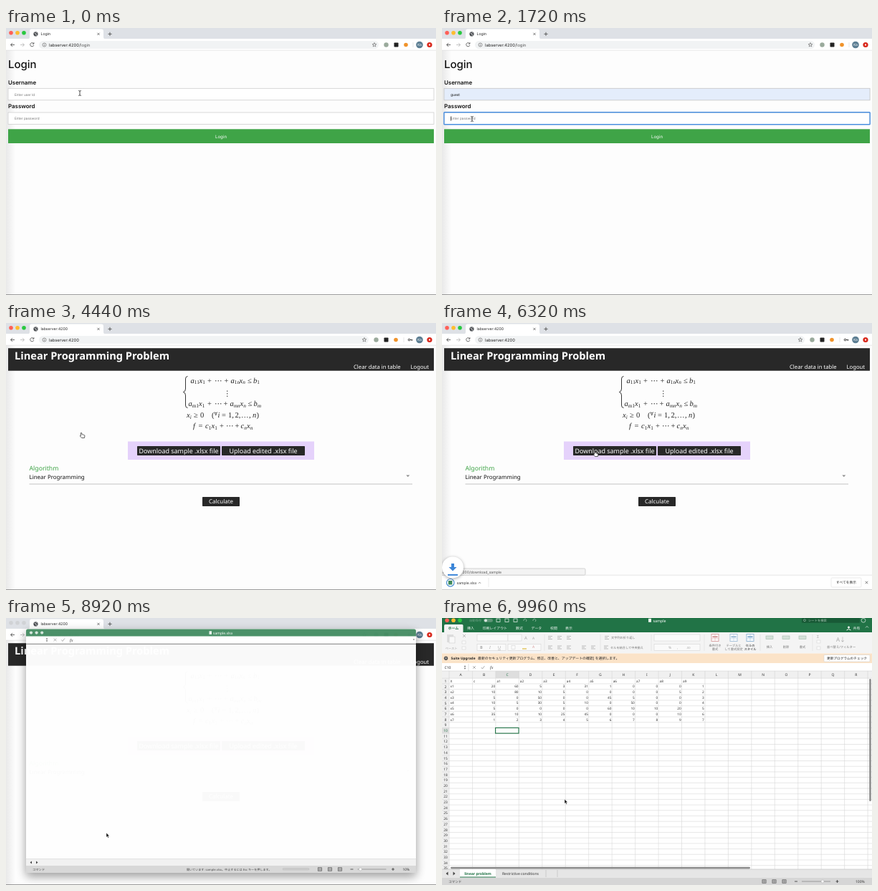
An HTML page for the animation above (10000 ms loop, 600 by 373 pixels).

```html
<!DOCTYPE html>
<html lang="en">
<head>
<meta charset="utf-8">
<title>Login</title>
<style>
html, body { margin: 0; width: 100%; height: 100%; overflow: hidden; background: #fdfdfd; }
svg { display: block; width: 600px; height: 373px; }
text { font-family: Inter, "Noto Sans CJK JP", "Noto Sans CJK", sans-serif; text-rendering: geometricPrecision; white-space: pre; }
.page text { font-family: "Noto Sans", sans-serif; }
.page .math text { font-family: "Liberation Serif", serif; font-style: italic; }
.page .math .up { font-style: normal; }
.sheet text { font-family: "Noto Sans", "Noto Sans CJK JP", "Noto Sans CJK", sans-serif; }
#loading { filter: drop-shadow(0 5px 7px rgba(0,0,0,.4)); }
</style>
</head>
<body>
<script>
const LOOP = 10000;
const HOST = 'labserver:4200';

// Drawing helpers, each returning SVG markup
const rect = (x, y, w, h, fill, more = '') =>
  `<rect x="${x}" y="${y}" width="${w}" height="${h}" fill="${fill}" ${more}/>`;
const dot = (x, y, r, fill, more = '') => `<circle cx="${x}" cy="${y}" r="${r}" fill="${fill}" ${more}/>`;
const line = (d, color, w = .7, more = '') =>
  `<path d="${d}" fill="none" stroke="${color}" stroke-width="${w}" ${more}/>`;
const shape = (d, fill, more = '') => `<path d="${d}" fill="${fill}" ${more}/>`;
const text = (x, y, size, s, fill = '#222', more = '') =>
  `<text x="${x}" y="${y}" font-size="${size}" fill="${fill}" ${more}>${s}</text>`;
const group = (id, body, cls = '') => `<g id="${id}" class="${cls}">${body}</g>`;
const MID = 'text-anchor="middle"', END = 'text-anchor="end"', BOLD = 'font-weight="700"';
const cross = (x, y, r, color, w) =>
  line(`M${x - r} ${y - r}l${2 * r} ${2 * r}m0 ${-2 * r}l${-2 * r} ${2 * r}`, color, w);
const plus = (x, y, r, color, w) => line(`M${x - r} ${y}h${2 * r}m${-r} ${-r}v${2 * r}`, color, w);
const lights = (y, colors, r = 2.8, x = 7, gap = 9) =>
  colors.map((c, i) => dot(x + i * gap, y, r, c)).join('');
const TRAFFIC = ['#ff5f57', '#febc2e', '#28c840'];
const updown = (x, y) => shape(`M${x - 1.3} ${y - .8}l1.3-2 1.3 2zm0 1.6l1.3 2 1.3-2z`, '#666');
const check = (x, y) => line(`M${x - 2.2} ${y}l1.6 2 3-4`, '#999', .8);
const fx = (x, y) => text(x, y, 6, 'fx', '#333', 'font-style="italic" style="font-family:\'Liberation Serif\',serif"');

function star(x, y) {
  let d = '';
  for (let i = 0; i < 10; i++) {
    const a = i * Math.PI / 5, r = i % 2 ? 1.3 : 3;
    d += `${i ? 'L' : 'M'}${(x + r * Math.sin(a)).toFixed(2)} ${(y - r * Math.cos(a)).toFixed(2)}`;
  }
  return line(d + 'z', '#555', .6);
}

function extensions(x) {
  return star(x, 23.5) + dot(x + 16.5, 23.5, 3.2, '#9aaa9c') +
    rect(x + 27.5, 20.5, 6, 6, '#222', 'rx=".8"') + dot(x + 44, 23.5, 2.8, '#f0932b');
}

function browser() {
  return rect(0, 0, 600, 15.5, '#dee1e6') + rect(0, 15, 600, 16, '#fff') +
    group('active', lights(6.8, TRAFFIC)) + group('inactive', lights(6.8, ['#d0d2d5', '#d0d2d5', '#d0d2d5'])) +
    shape('M30 15.5q3 0 3-3V4.500q0-3 3-3H133q3 0 3 3v8q0 3 3 3z', '#fff') +
    dot(41.5, 8.4, 3.1, '#4a4d51') +
    line('M39.500 7l2 .8 .4 2 1.800 .5M42 5.700l1.500 1.600', '#e8e8e8', .8) +
    cross(129, 8.4, 1.6, '#444', .7) + plus(145, 8.4, 2.6, '#444', .8) +
    line('M12 23.500H6.500m2.500-2.500l-2.500 2.500 2.500 2.500', '#444', .8) +
    line('M20 23.500h5.500m-2.500-2.500l2.500 2.500-2.500 2.500', '#b5b5b5', .8) +
    line('M38.500 21.800a2.600 2.600 0 1 0 .3 2.300M38.900 20.200v2h-2', '#444', .8) +
    group('barWide', rect(46, 18, 474, 11, '#f1f3f4', 'rx="5.5"') + extensions(514) +
      line('M568 20v7', '#ccc', .5)) +
    group('barKey', rect(46, 18, 460, 11, '#f1f3f4', 'rx="5.5"') + extensions(500) +
      line('M555 20v7', '#ccc', .5) + dot(562.500, 23.500, 1.3, 'none', 'stroke="#333" stroke-width="1"') +
      line('M563.800 23.500h3.500m-1 0v1.400', '#333', .9)) +
    dot(53.5, 23.5, 2.5, 'none', 'stroke="#555" stroke-width=".6"') +
    line('M53.500 23.200v1.800m0-3.100v.6', '#555', .6) +
    dot(577, 23.5, 4.8, '#5b7d92') + text(577, 25.2, 4.6, 'Ka', '#fff', MID) +
    dot(591, 23.5, 3.6, '#d8281c') + rect(590, 22.5, 2, 2, '#fff') +
    line('M0 31.200H600', '#d9d9d9', .6);
}

function login() {
  const field = (y, color = '#fff') => rect(3, y, 594, 16.5, color, 'stroke="#c8c8c8" stroke-width=".7"');
  return text(48.5, 10.4, 5.2, 'Login') +
    text(60, 25.6, 5.8, HOST + '<tspan fill="#555">/login</tspan>') +
    text(3, 56, 15, 'Login', '#111', 'font-weight="500"') +
    text(3, 78.5, 7.9, 'Username', '#111', 'font-weight="600"') +
    text(3, 112.2, 7.9, 'Password', '#111', 'font-weight="600"') +
    field(84.3) + field(118) +
    group('userEmpty', text(12, 94.5, 4.7, 'Enter user Id', '#757575')) +
    group('userFilled', field(84.3, '#e4edfb') + text(12, 94.5, 4.9, 'guest', '#111')) +
    group('passEmpty', text(12, 128.3, 4.7, 'Enter password', '#757575')) +
    group('dots', Array.from({ length: 5 }, (_, i) => dot(13.5 + i * 2.9, 126.6, 1, '#222')).join('')) +
    rect(3, 141.3, 594, 19.7, '#3fa447', 'id="button"') + text(300, 153.6, 6.2, 'Login', '#fff', MID) +
    rect(2.8, 84.1, 594.4, 16.9, 'none', 'id="ring" stroke="#4a8fe0" stroke-width="1.4" rx=".8"') +
    line('M12.500 123.500v6.200', '#111', .7, 'id="caret"');
}

// Each term: x, base, optional subscript; upright unless it is a letter
const formula = (y, ...terms) => terms.map(([x, base, sub]) =>
  `<text x="${x}" y="${y}" font-size="10.5" fill="#222" class="${/[a-z]/.test(base) ? '' : 'up'}">${base}` +
  (sub ? `<tspan font-size="7.3" dy="1.8" class="${/\d/.test(sub) ? 'up' : ''}">${sub}</tspan>` : '') + '</text>').join('');

function app() {
  const black = (x, y, w, h) => rect(x, y, w, h, '#282828', 'rx=".8"');
  const math = formula(83.5, [257.5, 'a', '11'], [269.5, 'x', '1'], [281, '+'], [291, '⋯'], [304.5, '+'],
      [313.5, 'a', '1n'], [325.5, 'x', 'n'], [337, '≤'], [345, 'b', '1']) +
    formula(102, [303.5, '⋮']) +
    formula(116, [254.5, 'a', 'm1'], [269, 'x', '1'], [281, '+'], [291, '⋯'], [303.5, '+'],
      [312.5, 'a', 'mn'], [326.5, 'x', 'n'], [337.5, '≤'], [345.5, 'b', 'm']) +
    formula(132, [252, 'x', 'i'], [262, '≥'], [271, '0'], [287, '('], [295.5, 'i'], [301, '='], [310, '1,'],
      [319.5, '2,'], [328, '…'], [339, ','], [344, 'n'], [349.5, ')']) +
    text(290.5, 128.5, 6.5, '∀', '#222', 'class="up"') +
    formula(147, [261, 'f'], [268.5, '='], [278, 'c', '1'], [286.5, 'x', '1'], [298, '+'], [307, '⋯'],
      [319.5, '+'], [327.5, 'c', 'n'], [336, 'x', 'n']);
  return text(48.5, 10.4, 5.2, HOST, '#222', 'style="font-family:Inter,sans-serif"') +
    text(60, 25.6, 5.8, HOST, '#222', 'style="font-family:Inter,sans-serif"') +
    rect(3, 35.2, 594, 31.5, '#282828') +
    text(12, 50.6, 14.6, 'Linear Programming Problem', '#fff', BOLD) +
    text(485, 63.6, 7.7, 'Clear data in table', '#fff') + text(564.5, 63.6, 7.7, 'Logout', '#fff') +
    `<g class="math">${math}</g>` +
    line('M253.500 74.500q-3 0-3 3.500v14q0 4-3.200 4.500q3.200 .5 3.200 4.500v14q0 3.500 3 3.500', '#222', .9) +
    rect(170, 165.5, 260, 25.5, '#e5d2fb') + black(183, 172, 116, 13) + black(301, 172, 116, 13) +
    text(241, 181.7, 8.95, 'Download sample .xlsx file', '#fff', MID) +
    text(359, 181.7, 8.95, 'Upload edited .xlsx file', '#fff', MID) +
    text(32.5, 206.2, 8.7, 'Algorithm', '#3fa447') + text(32.5, 217.8, 7.95, 'Linear Programming', '#111') +
    line('M32.500 225H567', '#aaa', .7) + shape('M558.300 212.500h5l-2.500 2.500z', '#888') +
    black(274, 243, 52, 13) + text(300, 252.2, 7.95, 'Calculate', '#fff', MID);
}

function shelf() {
  const chevron = x => line(`M${x - 1.5} 363.800l1.500-1.600 1.500 1.600`, '#555', .7);
  return rect(0, 352, 600, 20.5, '#fff') + line('M0 352.200H600', '#d5d5d5', .6) +
    rect(0, 352.4, 98, 19.8, '#c8c8c8', 'id="hover"') +
    rect(8.800, 360, 5.5, 5.5, '#3f8a5c') +
    group('fetch', dot(11.7, 362.8, 5.3, 'none', 'stroke="#4a90d0" stroke-width="1.2"') + chevron(52.5) +
      line('M65 356v13', '#ddd', .6)) +
    group('fetched', chevron(88)) +
    text(20.5, 365, 5.05, 'sample.xlsx', '#333') +
    rect(543, 356, 42, 13, '#fff', 'stroke="#ddd" stroke-width=".6" rx="1.5"') +
    text(564, 364.3, 4.75, 'すべてを表示', '#222', MID) + cross(592.5, 362.5, 1.7, '#444', .7);
}

const status = (x, y, pct, knob) =>
  [0, 14, 28].map(d => rect(x + d, y - 2.2, 5, 4.4, 'none', 'stroke="#555" stroke-width=".8"') +
    line(`M${x + d} ${y}h5m-2.500-2v4`, '#666', .6)).join('') +
  line(`M${x + 45} ${y}h4`, '#333', .8) + line(`M${x + 55} ${y}h40`, '#999', 1) + dot(x + knob, y, 2, '#fff', 'stroke="#aaa" stroke-width=".5"') +
  plus(x + 104.5, y, 2, '#333', .8) + text(x + 118, y + 1.7, 4.9, pct, '#333');

function loading() {
  return rect(28, 15.5, 544, 340.5, '#fff', 'rx="2"') + shape('M28 25.500v-7.500q0-2.500 2.500-2.500h539q2.500 0 2.500 2.500v7.500z', '#488f66') +
    lights(20.6, ['#d5e6dc', '#d5e6dc', '#d5e6dc'], 2.1, 35, 7.6) +
    rect(283.500, 18.3, 3.5, 4.6, '#e8f2ec') + text(289, 22.6, 5, 'sample.xlsx', '#fff') +
    updown(57, 30.5) + cross(68.5, 30.5, 1.8, '#999', .8) + check(79.5, 30.5) + fx(89, 32.5) +
    dot(569, 30, .8, '#555') + line('M28 36.300H572', '#777', .9) +
    rect(28, 336.5, 544, 9.5, '#f1f1f1') + line('M28 336.500H572', '#ccc', .5) +
    shape('M36 339.500v4l-2.500-2zm6 0v4l2.500-2z', '#444') +
    rect(28, 346, 544, 10, '#d8d8d8') + text(37, 352.7, 4.3, 'コマンド', '#444') +
    text(252, 352.700, 4.1, '開いています: sample.xlsx。中止するには Esc キーを押します。', '#444') +
    rect(386, 349.500, 37, 2.6, '#cacaca', 'stroke="#b5b5b5" stroke-width=".4" rx="1.3"') + status(435.5, 351, '10%', 59);
}

const COLS = 18, COL_W = 32.45, ROW_H = 7.69, LEFT = 10, TOP = 84.2;
const TABLE = [
  'X c a1 a2 a3 a4 a5 a6 a7 a8 a9',
  'x1 20 60 5 3 31 1 0 0 0 1', 'x2 10 80 10 5 0 0 0 0 5 2', 'x3 5 0 50 0 0 45 5 0 0 3',
  'x4 10 5 30 5 10 0 50 0 0 4', 'x5 5 0 0 0 0 60 10 10 20 5', 'x6 35 10 10 25 45 0 0 0 10 6',
  'x7 1 2 3 4 5 6 7 8 9 7'].map(r => r.split(' '));

function ribbon() {
  const faded = '#a8a8a8';
  const label = (x, y, s, c = '#777') => text(x, y, 4.3, s, c, MID);
  const box = (x, y, w, h = 9) => rect(x, y, w, h, '#fafafa', 'stroke="#d5d5d5" stroke-width=".6"');
  const bars = (x, y) => line(`M${x} ${y - 2}h6m-6 2h4m-4 2h6`, faded, .7);
  let s = rect(0, 20, 600, 29.5, '#f4f4f4') +
    rect(7, 23, 9, 11, '#ddd') + rect(10, 26, 8, 9, '#f8f8f8', 'stroke="#ccc" stroke-width=".6"') +
    label(13, 43.500, 'ペースト', faded) + cross(31, 25, 2, faded, .7) + box(28, 32, 5, 4) + box(28, 40, 5, 4) +
    box(49, 23, 43) + box(92, 23, 19) + box(49, 36.5, 40) + box(92, 36.5, 46) +
    text(115, 30, 6, 'A', faded) + text(126, 30, 5, 'A', faded) +
    text(53, 43, 5.5, 'B', faded, BOLD) + text(66, 43, 5.5, 'I', faded, 'font-style="italic"') +
    text(78, 43, 5.5, 'U', faded, 'text-decoration="underline"') + box(97, 38.5, 5, 5) +
    line('M112 43h6', '#e8d48a', 2) + text(126, 42, 5, 'A', '#d89a9a');
  for (const x of [148, 161, 174]) s += bars(x, 27.5) + bars(x, 41);
  s += bars(195, 41) + bars(208, 41) + bars(227, 27.5) + bars(226, 41) +
    text(236, 29.2, 4.2, '文字列の折り返し', '#777') + text(235, 42.7, 4.2, 'セルを結合して中央揃え', '#777') +
    box(296, 23, 64) + box(296, 36.5, 64) + text(316, 43, 5, '%', faded) + text(328, 43, 5, ',', faded) +
    text(341, 42.7, 4, '.00', faded) + line('M143 23v23M221 23v23M292 23v23M366 23v23M444 23v23M517 23v23', '#ddd', .6);
  for (const [x, c] of [[376, '#d9a5a5'], [402, '#a9c3da'], [425, '#96b8d5']])
    s += rect(x, 22.5, 10, 10, '#fff', `stroke="${c}" stroke-width="1"`) + rect(x + 1.5, 25, 7, 2.5, c) + line(`M${x} 29h10m-5-6v9`, c, .5);
  s += label(381, 39.5, '条件付き') + label(381, 45.3, '書式') + label(407, 39.500, 'テーブルと') + label(407, 45.3, 'して書式設定') +
    label(430, 39.5, 'セルの', '#222') + label(430, 45.3, 'スタイル', '#222');
  [['挿入', 457], ['削除', 480], ['書式', 503]].forEach(([n, x]) => {
    s += rect(x - 5, 25, 10, 4.5, '#d5e1d9', 'stroke="#a5bdae" stroke-width=".6"') + label(x, 42, n);
  });
  return s + text(523, 28, 5.5, 'Σ', faded) + box(523, 31, 5, 4) + box(523, 40, 5, 4) +
    text(550, 33, 8, 'A↓', faded) + text(537, 42, 4.3, '並べ替え/フィルター', '#777');
}

function sheet() {
  const white = '#f2f7f4';
  let s = rect(0, 0, 600, 373, '#fff') + rect(0, 0, 600, 20, '#217346') + lights(3.2, TRAFFIC) +
    text(38, 5, 4.3, '自動保存', '#6fa286') + rect(58, 1, 13, 4.800, '#5d9476', 'rx="2.4"') + dot(61, 3.4, 2, '#d8e6de');
  for (const x of [76, 88, 100]) s += rect(x, 1, 5, 4.5, 'none', 'stroke="#d8e6de" stroke-width=".8"');
  s += line('M114 4a2 2 0 1 1 3 1M127 4a2 2 0 1 1 3 1', '#9cc0ab', .8) +
    rect(288, .8, 4, 5, '#e8f2ec') + text(294.5, 5.5, 5.3, 'sample', '#fff') +
    rect(502, .3, 81, 6.5, '#185a36', 'rx="1"') + dot(506, 3.2, 1.5, 'none', 'stroke="#a9c7b5" stroke-width=".6"') +
    text(511, 5, 4.3, 'シートを検索', '#a9c7b5') + dot(588, 3.3, 2.9, 'none', 'stroke="#e0ebe4" stroke-width=".7"') +
    shape('M3 20V10.500q0-1.500 1.500-1.500H28q1.500 0 1.500 1.500V20z', '#f4f4f4') + text(8.5, 16.2, 5, 'ホーム', '#217346', BOLD);
  [['挿入', 35], ['印刷レイアウト', 56.5], ['数式', 103], ['データ', 124.5], ['校閲', 151], ['表示', 172], ['共有', 573.5]]
    .forEach(([n, x]) => { s += text(x, 16.2, 4.95, n, white); });
  s += dot(567.5, 13, 1.5, white) + line('M564.500 17q3-3 6 0', white, 1) + line('M591 13.500l2-2 2 2', white, .7) + ribbon() +
    rect(0, 49.5, 600, 13.5, '#fbe3c8') + dot(5.500, 56.2, 2.7, '#555') + cross(5.5, 56.2, 1, '#fff', .6) +
    text(12.5, 58, 4.8, 'Suite Upgrade', '#222', BOLD) +
    text(50, 58, 4.9, '最新のセキュリティ更新プログラム、修正、改善と、アップデートの確認] を選択します。', '#222') +
    rect(533, 51.5, 64, 9.5, '#fff', 'stroke="#ccc" stroke-width=".5" rx="1"') +
    text(565, 57.9, 4.7, '更新プログラムのチェック', '#222', MID) +
    text(3.500, 71, 5, 'C10') + updown(32, 69) + cross(45, 69, 1.8, '#999', .8) + check(57, 69) + fx(67, 71) +
    line('M37 64v10', '#ccc', .6) + rect(0, 74, 600, 10.2, '#f0f0f0') + rect(0, 84, LEFT, 267, '#f0f0f0') +
    rect(LEFT + 2 * COL_W, 74, COL_W, 10, '#dedede') + rect(0, TOP + 9 * ROW_H, LEFT, ROW_H, '#dedede');
  let grid = 'M0 74H600M0 84.200H600';
  for (let c = 0; c <= COLS; c++) {
    const x = LEFT + c * COL_W;
    grid += `M${x} 74V351`;
    if (c < COLS) s += text(x + COL_W / 2, 81.2, 5, String.fromCharCode(65 + c), c === 2 ? '#217346' : '#333', MID);
  }
  for (let r = 1; r <= 35; r++) {
    const y = TOP + r * ROW_H;
    if (r < 35) grid += `M0 ${y}H600`;
    s += text(5, y - 2, 4.9, r, r === 10 ? '#217346' : '#333', MID);
  }
  s += line(grid, '#d4d4d4', .55);
  TABLE.forEach((row, r) => row.forEach((v, c) => {
    const y = TOP + (r + 1) * ROW_H - 2.2, x = LEFT + c * COL_W, left = r === 0 || c === 0;
    s += text(left ? x + 1.5 : x + COL_W - (c === 10 ? 1.2 : .8), y, 4.7, v, '#333', left ? '' : END);
  }));
  s += rect(LEFT + 2 * COL_W - .3, TOP + 9 * ROW_H, COL_W, ROW_H, 'none', 'stroke="#217346" stroke-width="1.1"') +
    rect(12, 347.8, 418, 2.6, '#8d8d8d', 'rx="1.3"') + rect(596.2, 85, 2.6, 171, '#8d8d8d', 'rx="1.3"') +
    rect(0, 351, 600, 12, '#e6e6e6') + line('M0 351H600', '#bbb', .6) +
    shape('M8.500 354.500v5l-3-2.500zm7 0v5l3-2.500z', '#444') + rect(25, 351, 50, 11.3, '#fff') +
    line('M25 362H75', '#217346', 1) + text(50, 358.6, 5.1, 'linear problem', '#217346', MID + ' font-weight="600"') +
    text(109.5, 358.6, 5.1, 'Restrictive conditions', '#333', MID) + line('M145 352v10M161 352v10', '#bbb', .6) +
    rect(0, 363, 600, 10, '#d6d6d6') + text(9, 369.8, 4.6, 'コマンド', '#444') + status(447, 368, '', 84) +
    text(577, 369.9, 5, '100%', '#333');
  return s;
}

const POINTERS = {
  beam: line('M-1.800-3.500q1.800 0 1.800 1.200v4.600q0 1.200-1.800 1.200M1.800-3.500Q0-3.500 0-2.300M0 2.300Q0 3.500 1.800 3.500', '#222', .8),
  hand: shape('M-1.600-3.500q.9-.7 1.300 .2l.6 2.100 2.400 .5q1.400 .3 1.200 1.700l-.5 2.500h-3.800l-2.300-2.700q0-1 1.300-.5z', '#fff', 'stroke="#222" stroke-width=".7"'),
  arrow: shape('M0-2.800v6l1.400-1.200 1 2.300 1-.5-1-2.200h1.900z', '#111', 'stroke="#fff" stroke-width=".4"')
};

document.body.innerHTML = `<svg viewBox="0 0 600 373" xmlns="http://www.w3.org/2000/svg">
  <defs><linearGradient id="edge"><stop stop-color="#e9e9e9"/><stop offset="1" stop-color="#e9e9e9" stop-opacity="0"/></linearGradient></defs>` +
  rect(0, 0, 600, 373, '#fdfdfd') + rect(0, 31, 13, 342, 'url(#edge)') + browser() +
  group('login', login()) + group('app', app(), 'page') + line('M0 372.600H600', '#777', .8) +
  group('shelf', shelf()) +
  group('link', rect(-1, 343, 201, 9.2, '#f3f3f3', 'stroke="#bbb" stroke-width=".6" rx="1.5"') +
    text(83, 349.6, 5.1, HOST + '/download_sample', '#555', END)) +
  group('drop', dot(0, 0, 15, '#fff', 'style="filter:drop-shadow(0 1px 2px rgba(0,0,0,.35))"') +
    shape('M-2-5.500h4v5h3.500L0 5-5.500-.5H-2z', '#3c86d8') + rect(-7, 9.5, 14, 2, '#3c86d8')) +
  group('loading', loading(), 'sheet') + group('sheet', sheet(), 'sheet') +
  group('pointer', Object.entries(POINTERS).map(([k, v]) => group(k, v)).join('') +
    dot(0, 0, 9.5, 'none', 'id="press" stroke="#222" stroke-width=".9"')) + '</svg>';

const $ = id => document.getElementById(id);

// Visible from / until, in ms
const SPANS = {
  login: [[0, 3480]], app: [[3480, LOOP]], barWide: [[0, 2400]], barKey: [[2400, LOOP]],
  active: [[0, 8600]], inactive: [[8600, LOOP]],
  userEmpty: [[0, 960]], userFilled: [[960, LOOP]], passEmpty: [[0, 2160]], ring: [[200, 3300]],
  link: [[5480, 6680]], shelf: [[6040, 8560]], fetch: [[6040, 6960]], fetched: [[6960, LOOP]],
  hover: [[7200, LOOP]], drop: [[6080, 6840]], loading: [[8680, LOOP]], sheet: [[9520, LOOP]],
  beam: [[0, 560], [1360, 1920]], hand: [[1920, 4560], [5240, 6560]],
  arrow: [[560, 1360], [4560, 5240], [6560, LOOP]],
  press: [[7700, 7900]]
};

// Pointer stops: time, x, y
const PATH = [[0, 103, 91], [320, 103, 91], [760, 60, 119], [1000, 60, 119], [1400, 42, 127], [1760, 42, 127],
  [2080, 106, 157], [4480, 106, 157], [5280, 214, 183], [6400, 214, 183], [7320, 35, 365], [8320, 35, 365],
  [8880, 140, 303], [8960, 140, 303], [9240, 171, 256], [LOOP, 171, 256]];

const clamp = v => Math.max(0, Math.min(1, v));
const ramp = (t, a, b) => clamp((t - a) / (b - a));
const ease = p => p * p * (3 - 2 * p);

function pointerAt(t) {
  const i = PATH.findIndex(p => p[0] > t), [t0, x0, y0] = PATH[i - 1], [t1, x1, y1] = PATH[i];
  const p = ease(ramp(t, t0, t1));
  return [x0 + (x1 - x0) * p, y0 + (y1 - y0) * p];
}

function draw(t) {
  for (const id in SPANS)
    $(id).style.display = SPANS[id].some(([a, b]) => t >= a && t < b) ? '' : 'none';
  const [x, y] = pointerAt(t);
  $('pointer').setAttribute('transform', `translate(${x} ${y})`);

  $('ring').setAttribute('y', t < 1440 ? 84.1 : 117.8);
  const typed = t < 2160 ? 0 : Math.min(5, 1 + Math.floor((t - 2160) / 160));
  [...$('dots').children].forEach((d, i) => { d.style.display = i < typed ? '' : 'none'; });
  $('caret').style.display = t >= 1440 && t < 3300 && (typed || (t - 1440) % 1000 < 500) ? '' : 'none';
  $('caret').setAttribute('transform', `translate(${typed * 2.9} 0)`);
  $('button').setAttribute('fill', t >= 2040 ? '#4fab57' : '#3fa447');

  const rise = 20 * (1 - ramp(t, 6040, 6200));
  $('shelf').setAttribute('transform', `translate(0 ${rise})`);
  $('link').setAttribute('transform', `translate(0 ${rise})`);
  $('drop').setAttribute('transform', `translate(15 ${325 + 34 * ramp(t, 6080, 6580)})`);
  $('drop').style.opacity = Math.min(ramp(t, 6080, 6280), 1 - ramp(t, 6480, 6840));

  $('loading').style.opacity = .978 * ramp(t, 8680, 8900) + .022 * ramp(t, 8920, 9000);
  const p = ease(ramp(t, 9480, 9760)), k = .907 + .093 * p;
  $('sheet').setAttribute('transform', `translate(${28 * (1 - p)} ${15.5 * (1 - p)}) scale(${k})`);
  $('sheet').style.opacity = ramp(t, 9480, 9640);
}

const start = performance.now();
function tick() {
  draw((performance.now() - start) % LOOP);
  requestAnimationFrame(tick);
}
tick();
</script>
</body>
</html>
```
